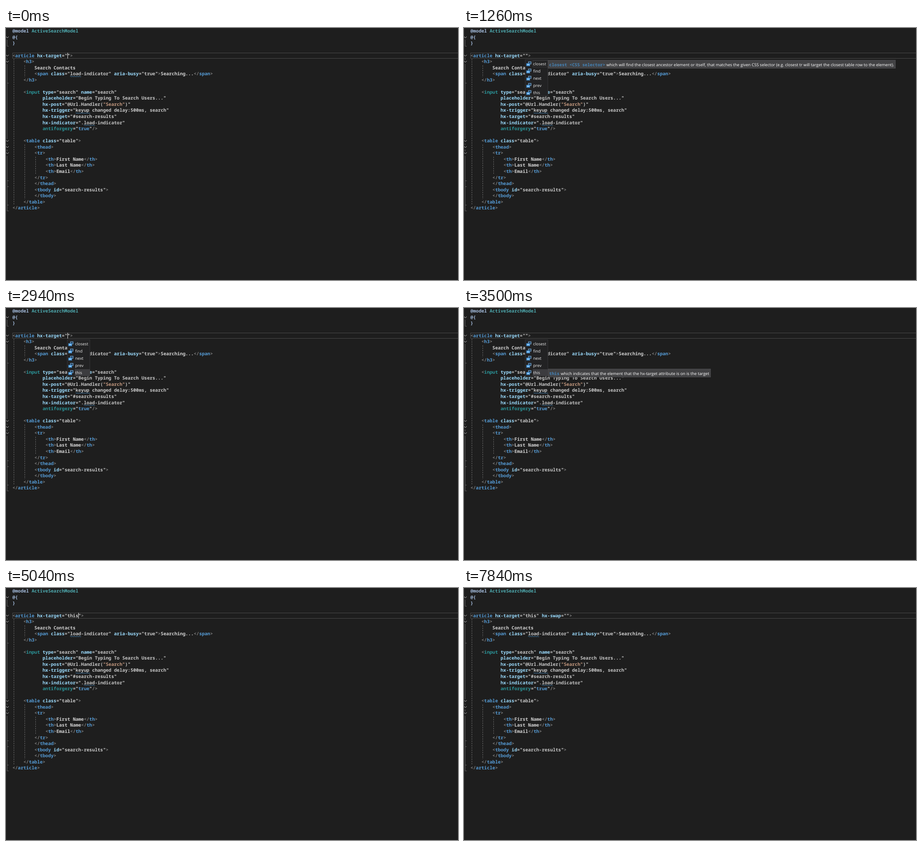
These frames come from a looping animation (1000 by 560 pixels, 8 s). An HTML page:

```html
<!DOCTYPE html>
<html lang="en">
<head>
<meta charset="utf-8">
<title>Editor completion</title>
<style>
html, body { margin: 0; width: 100%; height: 100%; overflow: hidden; background: #1e1e1e; }
svg { display: block; width: 1000px; height: 560px; }
text { white-space: pre; text-rendering: geometricPrecision; }
.code { font: 600 10.13px "Noto Sans Mono", "DejaVu Sans Mono", monospace; fill: #d4d4d4; }
.ui { font: 9px "Open Sans", "Noto Sans", sans-serif; fill: #f0f0f0; }
#tipText { font-size: 9.08px; fill: #fff; }
.mono { font: 600 9.4px "Noto Sans Mono", monospace; fill: #4585ba; }
.punct { fill: #808080; }
.tag, .key { fill: #569cd6; }
.attr { fill: #9cdcfe; }
.val { fill: #c8c8c8; }
.str { fill: #c69a80; }
.dir { fill: #a3bbdc; }
.type { fill: #4ea9ae; }
.helper { fill: #2b9599; font-weight: 700; }
.fold, .guide, .wave, .chev { fill: none; }
.fold { stroke: #606060; }
.guide { stroke: #6a6a6a; stroke-dasharray: 3 2; }
.wave { stroke: #4d8fc4; }
.chev { stroke: #c4c4c4; }
</style>
</head>
<body>
<svg viewBox="0 0 1000 560">
  <path class="fold" d="M2.5 26V40.5H6M2.5 66V71M2.5 80V247M2.5 257V260M2.5 270V274M2.5 284V406.5H6M2.5 122.5H6M2.5 339.5H6M2.5 352.5H6M2.5 393.5H6"/>
  <path class="guide" d="M17.5 69V393M41.5 83V109M41.5 259V380M65.5 286V326"/>
  <path d="M1000 55.5H14.5V67.5H1000" fill="none" stroke="#4a4a4a"/>
  <g id="chevs" class="chev"></g>
  <g id="code" class="code"></g>
  <g id="waves" class="wave"></g>
  <path id="caret" stroke="#e0e0e0" d="M.5 55V68"/>
  <g id="list">
    <rect x="135.5" y="70.5" width="50" height="80.5" fill="#222223" stroke="#343437"/>
    <rect id="pick" x="152.5" width="33" height="14" stroke="#3c3c3f"/>
    <g id="items" class="ui"></g>
  </g>
  <g id="tip">
    <rect id="tipBox" x="186.5" height="18" fill="#424244" stroke="#4a4a4d"/>
    <text id="tipName" class="mono" x="188.5"></text>
    <text id="tipText" class="ui"></text>
  </g>
</svg>
<script>
const $ = id => document.getElementById(id);
const X = 14.2, CH = 6.078, LINE = 13.55;
const span = (cls, s) => `<tspan class="${cls}">${s.replace(/</g, "&lt;")}</tspan>`;

// Colours one line of markup.
function paint(s) {
  const rule = /(<\/?)(\w+)|\s+(?=[\w-]+=)|([\w-]+)=("@Url.*\)"|"[^"]*")|(\/?>)|(^@\w+|^@?[{}])( \w+)?|[^<>]+/g;
  return s.replace(rule, (m, open, tag, attr, val, close, dir, type) => {
    if (open) return span("punct", open) + span(tag == "input" ? "helper" : "tag", tag);
    if (attr) {
      const own = attr == "antiforgery";
      const body = own ? `"${span("key", "true")}"`
        : val.replace(/"Search"/, span("str", '"Search"'));
      return span(own ? "helper" : "attr", attr) + `<tspan class="val">=${body}</tspan>`;
    }
    if (close) return span("punct", close);
    if (dir) return span("dir", dir) + span("type", type || "");
    return m;
  });
}

const article = s => `<article hx-target="${s}>`;
const lines = `@model ActiveSearchModel
@{
}

${article('"')}
    <h3>
        Search Contacts
        <span class="load-indicator" aria-busy="true">Searching...</span>
    </h3>

    <input type="search" name="search"
           placeholder="Begin Typing To Search Users..."
           hx-post="@Url.Handler("Search")"
           hx-trigger="keyup changed delay:500ms, search"
           hx-target="#search-results"
           hx-indicator=".load-indicator"
           antiforgery="true"/>

    <table class="table">
        <thead>
        <tr>
            <th>First Name</th>
            <th>Last Name</th>
            <th>Email</th>
        </tr>
        </thead>
        <tbody id="search-results">
        </tbody>
    </table>
</article>`.split("\n");

$("code").innerHTML = lines.map((s, i) => {
  const pad = s.search(/\S|$/);
  return `<text x="${X + pad * CH}" y="${10.3 + i * LINE}">${paint(s.trim())}</text>`;
}).join("");
const typed = $("code").children[4];

$("chevs").innerHTML = [1, 4, 5, 18, 19, 20].map(i =>
  `<path d="M0 ${5.5 + i * LINE}l3 3l3 -3"/>`).join("");

const wave = (row, col, n) => {
  let d = `M${X + col * CH} ${13 + row * LINE}`;
  for (let x = 0; x < n * CH - 2; x += 4) d += "q1 -2 2 0t2 0";
  return `<path d="${d}"/>`;
};
$("waves").innerHTML = wave(7, 21, 4) + wave(13, 23, 5) + wave(15, 26, 4);

const rowY = i => 79.5 + i * 16;
$("items").innerHTML = ["closest", "find", "next", "prev", "this"].map((s, i) => {
  const y = rowY(i);
  return `<rect x="142.5" y="${y - 4.5}" width="6" height="5" fill="#24405c" stroke="#7fb2de"/>
    <rect x="138" y="${y - 1}" width="8" height="6" fill="#4a9be0"/>
    <path d="M140 ${y + 2}h4" stroke="#fff"/>
    <text x="153" y="${y + 3.3}">${s}</text>`;
}).join("");

const tips = {
  0: { w: 768, at: 315, name: "closest <CSS selector>", text: "which will find the closest ancestor element or itself, that matches the given CSS selector (e.g. closest tr will target the closest table row to the element)." },
  1: { w: 5, at: 0, name: "", text: "" },
  4: { w: 359, at: 214, name: "this", text: "which indicates that the element that the hx-target attribute is on is the target" }
};

// time, attribute tail, caret column (0 = hidden), selected row (-1 = closed), tip opacity
const empty = '"', done = 'this"', swap = 'this" hx-swap=""';
const steps = [
  [0, empty, 20, -1, 0],
  [140, empty, 0, 0, 0],
  [700, empty, 20, 0, .85],
  [840, empty, 20, 0, 1],
  [1260, empty, 0, 0, 1],
  [1820, empty, 20, 1, .6],
  [1960, empty, 20, 1, .3],
  [2100, empty, 20, 1, 0],
  [2240, empty, 20, 2, 0],
  [2520, empty, 20, 3, 0],
  [2800, empty, 20, 4, 0],
  [3220, empty, 20, 4, .3],
  [3360, empty, 20, 4, .75],
  [3500, empty, 0, 4, 1],
  [4060, done, 24, -1, 0],
  [4480, done, 0, -1, 0],
  [5040, done, 24, -1, 0],
  [5740, done, 0, -1, 0],
  [6300, done, 24, -1, 0],
  [6580, done, 25, -1, 0],
  [7140, done, 0, -1, 0],
  [7280, done + " ", 26, -1, 0],
  [7700, swap, 35, -1, 0],
  [7840, swap, 0, -1, 0]
];

function show([, tail, caret, row, alpha]) {
  typed.innerHTML = paint(article(tail));
  $("caret").setAttribute("visibility", caret ? "visible" : "hidden");
  $("caret").setAttribute("transform", `translate(${Math.round(X + caret * CH)})`);
  $("list").setAttribute("visibility", row < 0 ? "hidden" : "visible");
  $("pick").setAttribute("y", rowY(row) - 7);
  // The first row is only suggested, so it gets an outline without a fill.
  $("pick").setAttribute("fill", row ? "#3c3c3f" : "none");
  $("tip").setAttribute("opacity", alpha);
  const tip = tips[row];
  if (!alpha || !tip) return;
  const y = rowY(row);
  $("tipBox").setAttribute("y", y - (row == 1 ? 24 : 8));
  $("tipBox").setAttribute("width", tip.w);
  $("tipBox").setAttribute("height", row == 1 ? 6 : 18);
  $("tipName").setAttribute("y", y + 5);
  $("tipName").textContent = tip.name;
  $("tipText").setAttribute("x", tip.at);
  $("tipText").setAttribute("y", y + 5);
  $("tipText").textContent = tip.text;
}

let last;
const start = performance.now();
function frame() {
  const t = (performance.now() - start) % 8000;
  const step = steps.findLast(s => s[0] <= t);
  if (step != last) show(last = step);
  requestAnimationFrame(frame);
}
frame();
</script>
</body>
</html>
```
